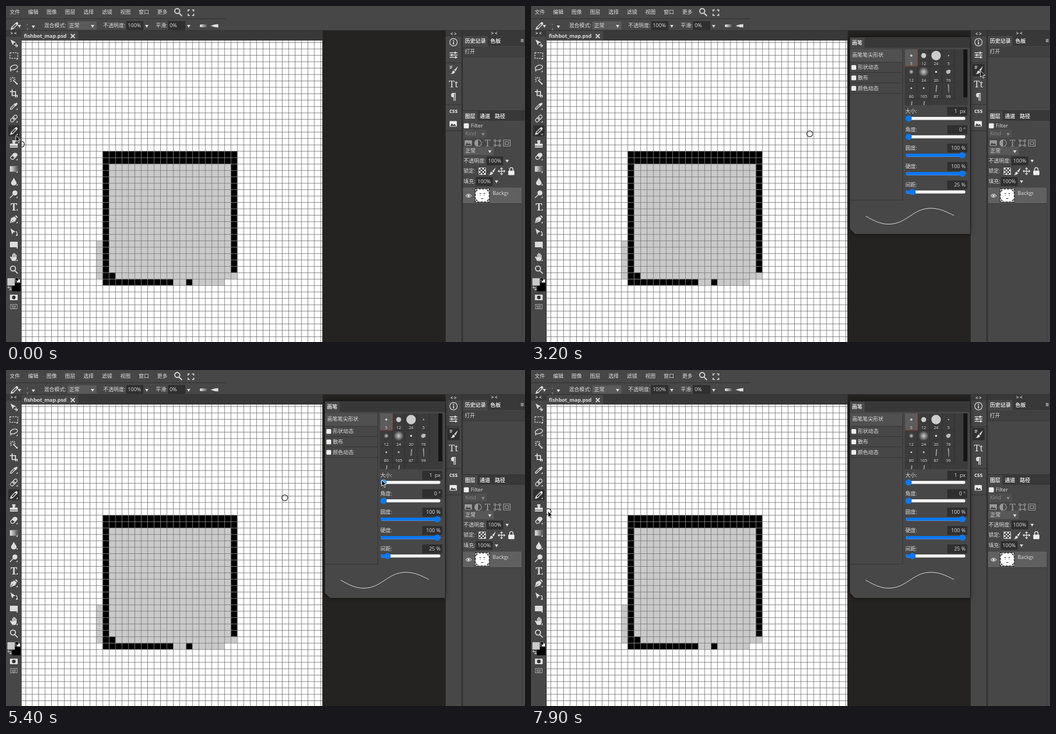
An HTML page for the animation above (8000 ms loop, 929 by 603 pixels).

```html
<!DOCTYPE html>
<html lang="zh">
<head>
<meta charset="utf-8">
<style>
html, body { margin: 0; width: 100%; height: 100%; overflow: hidden; background: #474747; }
svg { display: block; width: 929px; height: 603px; }
text { font-family: 'Open Sans', 'Noto Sans CJK SC', 'Noto Sans CJK', sans-serif; font-size: 9.32px; fill: #ddd; white-space: pre; }
.bold { font-weight: 700; }
.serif { font-family: 'Noto Serif', serif; }
.grid { mix-blend-mode: exclusion; }
</style>
</head>
<body>
<svg id="stage" viewBox="0 0 929 603">
  <defs>
    <linearGradient id="fade"><stop stop-color="#eee"/><stop offset="1" stop-color="#505050"/></linearGradient>
    <radialGradient id="soft"><stop stop-color="#ccc"/><stop offset="1" stop-color="#ccc" stop-opacity="0"/></radialGradient>
    <clipPath id="canvasArea"><rect x="28" y="62" width="538.2" height="541"/></clipPath>
    <clipPath id="layerName"><rect x="868" y="326" width="31" height="28"/></clipPath>
    <clipPath id="brushList"><rect x="669" y="78" width="113" height="100"/></clipPath>
    <filter id="shadow" x="-20%" y="-20%" width="140%" height="140%"><feDropShadow dx="0" dy="0" stdDeviation="5" flood-opacity=".55"/></filter>
  </defs>
</svg>
<script>
const PANEL = '#474747', DARK = '#2f2f2f', LIGHT = '#ddd', BLUE = '#0a78f5';
const rect = (x, y, w, h, fill, extra = '') =>
  `<rect x="${x}" y="${y}" width="${w}" height="${h}" fill="${fill}" ${extra}/>`;
// y is the vertical middle of the line
const text = (x, y, s, extra = '') => `<text x="${x}" y="${y + 3.4}" ${extra}>${s}</text>`;
const bold = (x, y, s, extra = '') => text(x, y, s, `class="bold" ${extra}`);
const circle = (x, y, r, fill, extra = '') => `<circle cx="${x}" cy="${y}" r="${r}" fill="${fill}" ${extra}/>`;
const solid = (x, y, d, fill = LIGHT) => `<path transform="translate(${x} ${y})" d="${d}" fill="${fill}"/>`;
const line = (x, y, d, width = 1.3, color = LIGHT, extra = '') =>
  `<path transform="translate(${x} ${y})" d="${d}" fill="none" stroke="${color}" stroke-width="${width}" ${extra}/>`;
const arrowDown = (x, y, fill = LIGHT) => solid(x, y, 'M-3-2H3L0 3Z', fill);
const field = (x, y, w, s) => rect(x, y - 8, w, 16, DARK, 'rx="1"') + text(x + 3, y, s);
const select = (x, y, w, s, bg, color = LIGHT) =>
  rect(x, y - 7.5, w, 15, bg, 'rx="1"') + text(x + 3, y, s, `style="fill:${color}"`) + arrowDown(x + w - 7, y + 1, color);

const PENCIL = 'M-7 7L-5.5 2L3-6.5Q4.5-8 6-6.5T6.5-3L-2 5.5ZM-4 2.5L-2.5 4L4-2.5L2.5-4Z';
const BRUSH = 'M7-7L3 2L0 0ZM-1 1L2 3Q1 7-6 7Q-3 5-3 3Q-3 1-1 1Z';
const MAGNIFIER = 'M2 2L7 7M3-2A4.5 4.5 0 1 1-6-2A4.5 4.5 0 1 1 3-2';
const MOVE = 'M-6 0H6M0-6V6M-4-2L-6 0L-4 2M4-2L6 0L4 2M-2-4L0-6L2-4M-2 4L0 6L2 4';
const picture = (x, y, color) => rect(x - 6, y - 5, 13, 10, color, 'rx="1"') + solid(x, y, 'M-5 4L-2-1L1 2L3 0L6 4Z', PANEL);

function drawing() {
  const pixel = .71725, cell = 16 * pixel, left = 241 * pixel, top = 363 * pixel;
  const fill = (col, row, cols, rows, color) =>
    rect(left + col * cell, top + row * cell, cols * cell, rows * cell, color);
  const gray = '#cacaca';
  let grid = '';
  for (let x = left - 12 * cell; x < 567; x += cell) grid += `M${x + pixel / 2} 62V603`;
  for (let y = top - 17 * cell; y < 603; y += cell) grid += `M28 ${y + pixel / 2}H567`;
  return `<g clip-path="url(#canvasArea)">` + rect(28, 62, 539, 541, '#fff') +
    fill(1, 2, 19, 18, gray) + fill(-1, 14, 1, 6, gray) + fill(20, 19, 1, 1, gray) + fill(11, 20, 8, 1, gray) +
    fill(0, 0, 21, 2, '#000') + fill(0, 2, 1, 19, '#000') + fill(20, 2, 1, 17, '#000') +
    fill(1, 19, 1, 1, '#000') + fill(1, 20, 10, 1, '#000') + fill(13, 20, 1, 1, '#000') +
    line(0, 0, grid, pixel, '#aaa', 'class="grid"') +
    circle(0, 0, 5.3, 'none', 'id="brush" stroke="#111" stroke-width="1.1"') + '</g>';
}

function topBars() {
  const menus = ['文件', '编辑', '图像', '图层', '选择', '滤镜', '视图', '窗口', '更多'];
  return rect(0, 0, 929, 44, PANEL) + rect(0, 22, 393, 1.5, '#383838') + rect(0, 43, 929, 1, '#383838') +
    menus.map((s, i) => text(6.5 + i * 33, 11, s)).join('') +
    line(308, 11, MAGNIFIER, 1.8) + line(331, 12, 'M-5-2V-5H-2M2-5H5V-2M5 2V5H2M-2 5H-5V2', 1.7) +
    solid(15, 36, PENCIL) + arrowDown(24, 36) + circle(38, 33, .7, LIGHT) +
    text(36.5, 41, '1', 'style="font-size:6px"') + arrowDown(49, 37) +
    text(68, 35, '混合模式:') + select(110, 35, 52, '正常', '#5a5a5a') +
    text(174, 35, '不透明度:') + field(215, 35, 31, '100%') + arrowDown(252, 36) +
    text(268, 35, '平滑:') + field(290, 35, 31, '0%') + arrowDown(327, 36) +
    rect(347, 33, 13, 5, 'url(#fade)', 'rx="2"') + solid(373, 35.5, 'M-7 0Q0-3 7-3V3Q0 3-7 0Z') +
    rect(28, 44, 539, 18, '#383838') + rect(28, 45, 101, 17, PANEL) +
    bold(32, 54, 'fishbot_map.psd') + line(119.5, 54, 'M-3.5-3.5L3.5 3.5M3.5-3.5L-3.5 3.5', 1.8);
}

function toolbar() {
  const tools = [
    solid(0, 0, 'M-6-6L4-1L0 0L-2 4Z') + line(4, 4, 'M-3.5 0H3.5M0-3.5V3.5'),
    line(0, 0, 'M-7-5H7V5H-7Z', 1.2, LIGHT, 'stroke-dasharray="3 1.6"'),
    line(0, 0, 'M-5 3C-10-2 0-7 5-5C10-2 3 4-4 3Q-7 3-5 6', 1.4),
    line(0, 0, 'M-1-1L6 6', 2) + line(-2, -2, 'M-5 0H-2M2 0H5M0-5V-2M-4-4L-2-2M4-4L2-2M-4 4L-2 2'),
    line(0, 0, 'M-3-7V4H7M-7-3H3V7', 1.8),
    line(0, 0, 'M1-4L4 0M2-1L6-5', 3.2) + line(0, 0, 'M0-2L-6 4V6H-4L2 0'),
    line(0, 0, 'M-6 2L2-6Q6-7 6-2L-2 6Q-6 7-6 2M-3-1L1 3M-1-3L3 1M-1-1L1 1', 1.3),
    solid(0, 0, PENCIL),
    solid(0, 0, 'M-3-6H3L2 0H7V4H-7V0H-2ZM-7 5H7V7H-7Z'),
    line(0, 0, 'M-6 2L0-5Q5-7 6-2L0 5Q-5 7-6 2', 1.4) + solid(0, 0, 'M-3-1L0-5Q5-7 6-2L2 3Z'),
    rect(-7, -5, 14, 10, 'url(#fade)', 'stroke="#888" stroke-width=".6"'),
    solid(0, 0, 'M0-7C2-2 5 0 5 3A5 4 0 0 1-5 3C-5 0-2-2 0-7'),
    circle(2, -2, 4.5, LIGHT) + line(0, 0, 'M-1 1L-7 7', 1.5),
    text(0, 3.2, 'T', 'class="serif" text-anchor="middle" style="font-size:18px;font-weight:600"'),
    solid(0, 0, 'M-7 7L-5-2L1-5L5-1L2 4ZM2-6L4-7L7-4L6-2Z') + line(0, 0, 'M-6 6L-1 1', 1, PANEL),
    solid(0, 0, 'M-6-6L3 0L-1 1L-3 5Z') + line(4, 3, 'M0-4Q4 0 0 4'),
    rect(-7, -5, 14, 10, LIGHT, 'rx="1"'),
    solid(0, 0, 'M-3 7L-7 0L-5-1L-3 1V-5H-1V-7H1V-6H3V-4H5V3L3 7Z') + line(0, 0, 'M-1-5V0M1-5V0M3-4V0', .6, PANEL),
    line(0, 0, MAGNIFIER, 1.8)
  ];
  return rect(0, 44, 28, 559, PANEL) + rect(0, 44, 28, 11, '#3a3a3a') + rect(27, 44, 1, 559, '#3c3c3c') +
    bold(13.5, 49, '&gt; &lt;', 'text-anchor="middle" style="font-size:8px"') +
    rect(4, 214, 20, 20, DARK, 'rx="2"') +
    tools.map((s, i) => `<g transform="translate(14 ${66.3 + i * 22.6})">${s}` +
      (i < 18 ? solid(7, 7, 'M0-3V0H-3Z') : '') + '</g>').join('') +
    rect(11, 497, 15, 15, '#000') + rect(2, 488, 14, 14, '#cacaca', 'stroke="#2a2a2a" stroke-width=".7"') +
    rect(20, 491, 5, 5, '#fff') + rect(17, 488, 5, 5, '#000', 'stroke="#bbb" stroke-width=".6"') +
    line(6, 507, 'M-1-4L-3-2L-1 0M-3-2H2V3M0 1L2 3L4 1', 1) +
    rect(7, 518, 14, 10, LIGHT, 'rx="1"') + circle(14, 523, 3.2, '#333') +
    line(14, 539.5, 'M-6-4H6V4H-6ZM-4-1.5H4M-4 .5H4M-3 2.5H3', 1, '#bbb', 'stroke-dasharray="2 .5"');
}

function iconColumn() {
  return rect(787, 44, 28, 559, PANEL) + rect(787, 44, 28, 11, '#3a3a3a') + rect(815, 44, 3, 559, '#333') +
    bold(801, 50, '&lt; &gt;', 'text-anchor="middle" style="font-size:8px"') +
    [101, 176, 223].map(y => rect(787, y, 28, 1.5, '#383838')).join('') +
    rect(790, 104, 22, 22, DARK, 'id="brushButton" rx="2"') +
    circle(801, 65, 6.7, 'none', `stroke="${LIGHT}" stroke-width="1.2"`) + line(801, 65, 'M0-4V-2M0-1V4', 1.7) +
    line(801, 88, 'M-7-4H7M-7 0H7M-7 4H7', 1.3) + line(801, 88, 'M3-6V-2M-3-2V2M4 2V6', 2) +
    solid(802, 115, BRUSH) + line(797, 110, 'M-3-2H2M-3 0H2M-3 2H1', 1) +
    text(801, 143, 'Tt', 'class="serif" text-anchor="middle" style="font-size:17px"') +
    bold(801, 165, '¶', 'text-anchor="middle" style="font-size:16px"') +
    bold(801, 189, 'css', 'text-anchor="middle" style="font-size:10px"') +
    picture(800, 211.5, '#eee');
}

function sidePanels() {
  const dim = '#8c8c8c';
  let checker = '';
  for (let i = 0; i < 16; i++) if ((i + (i >> 2)) % 2 === 0)
    checker += rect(846.5 + i % 4 * 3, 290.5 + (i >> 2) * 3, 3, 3, '#eee');
  return rect(818, 44, 111, 559, PANEL) + rect(818, 44, 111, 28, '#383838') +
    bold(874, 49, '&gt; &lt;', 'text-anchor="middle" style="font-size:8px"') +
    rect(818, 54, 44, 19, PANEL) + bold(821.5, 63, '历史记录') + bold(867, 63, '色板') +
    line(924, 62, 'M-2.5-2H2.5M-2.5 0H2.5M-2.5 2H2.5', 1) +
    rect(818, 73, 111, 18, '#404040') + rect(818, 91, 111, 1, '#383838') + text(821, 82, '打开') +
    rect(818, 187, 111, 19, '#383838') + rect(818, 189, 26, 17, PANEL) +
    bold(821.5, 198, '图层') + bold(848, 198, '通道') + bold(875, 198, '路径') +
    rect(819.5, 210.5, 9, 9, '#eee', 'rx="1.5"') + text(832, 214.5, 'Filter') +
    select(819, 229, 42, 'Kind', '#4f4f4f', dim) +
    picture(827, 246, '#999') + circle(845, 246, 6, 'none', 'stroke="#999" stroke-width="1.2"') +
    solid(845, 246, 'M0-6A6 6 0 0 0 0 6Z', '#999') +
    text(862, 248.5, 'T', 'class="serif" text-anchor="middle" style="font-size:17px;fill:#999"') +
    line(879.5, 246, 'M-4-4H4V4H-4ZM-6-6H-3V-3H-6ZM3-6H6V-3H3ZM-6 3H-3V6H-6ZM3 3H6V6H3Z', 1, '#999') +
    line(896.5, 246, 'M-6-5.5H6V5.5H-6ZM-3-2.5H3V2.5H-3Z', 1.2, '#999') +
    select(819, 260, 54, '正常', '#585858') +
    text(819, 278, '不透明度:') + field(860, 278, 30, '100%') + arrowDown(897, 278) +
    text(819, 296, '锁定:') + rect(846.5, 290.5, 12, 12, '#222') + checker +
    line(852.5, 296.5, 'M-6-6H6V6H-6Z', 1) + solid(870, 296.5, BRUSH) + line(887, 296.5, MOVE) +
    rect(899, 295.5, 11, 8, '#eee', 'rx="1"') + line(904.5, 295, 'M-3 1V-2A3 3 0 0 1 3-2V1', 1.6) +
    text(819, 315, '填充:') + field(841, 315, 30, '100%') + arrowDown(878, 315) +
    rect(818, 326, 105, 28, '#606060') + rect(923, 326, 1, 277, '#3e3e3e') + rect(818, 354, 105, 1, '#3c3c3c') +
    line(828, 340.5, 'M-5 0Q0-6 5 0Q0 6-5 0', 1.1) + circle(828, 340.5, 2, LIGHT) +
    rect(840, 328, 25, 23.5, '#fff') +
    line(852.5, 340, 'M-12.5-11.7H12.5V11.7H-12.5Z', 1.3, '#111', 'stroke-dasharray="4 2"') +
    solid(852.5, 340, 'M-11-10H-8L-11-6ZM11-10H8L11-6ZM-11 10H-8L-11 6ZM11 10H8L11 6ZM-5-4H-2V-3H-5ZM2-4H5V-3H2ZM-4-1H-3V0H-4ZM3-1H4V0H3ZM-2 5H2V6H-2Z', '#222') +
    text(871, 336, 'Background', 'clip-path="url(#layerName)"');
}

function brushPanel() {
  const sizes = [5, 12, 24, 5, 12, 24, 20, 76, 80, 105, 87, 99];
  const tips = [
    solid(0, 0, 'M0-2.5L2.5 0L0 2.5L-2.5 0Z', '#ccc'), circle(0, 0, 4.5, '#ccc'), circle(0, 0, 8.5, '#ccc'),
    circle(0, 0, 2, 'url(#soft)'), circle(0, 0, 4.5, 'url(#soft)'), circle(0, 0, 9, 'url(#soft)'),
    rect(-1.5, -1.5, 3, 3, '#eee'), solid(0, 0, 'M-4-2L0-4L4-3L3 2L-1 4L-4 2Z', '#bbb'),
    circle(0, 0, 1.5, '#ccc'), circle(0, 0, 1.7, '#bbb'),
    solid(0, 0, 'M0-5L2-6L1 6L-1 7Z', '#999'), solid(0, 0, 'M-1-8L1-6L1 8L0 8Z', '#aaa')
  ];
  let list = rect(669.5, 78, 22, 30, '#5c5c5c');
  tips.concat(tips[10], tips[10]).forEach((tip, i) => {
    const x = 680.7 + i % 4 * 22.2, y = 89 + (i >> 2) * 29.2;
    list += `<g transform="translate(${x} ${y})">${tip}</g>` +
      (sizes[i] ? text(x, y + 14, sizes[i], 'text-anchor="middle" style="font-size:7.3px"') : '');
  });
  const cells = 'M691.5 78V178M713.8 78V178M736 78V166M758 78V166M669 108H758M669 137H758M669 166H758';
  const sliders = [
    ['大小', '1  px', 676], ['角度', '0 °', 676], ['圆度', '100 %', 772], ['硬度', '100 %', 772], ['间距', '25 %', 683]
  ].map(([label, value, x], i) => {
    const y = 189 + i * 33;
    return text(670, y, label + ':') + rect(745, y - 8, 36, 16, DARK, 'rx="1"') +
      text(778, y, value, 'text-anchor="end"') +
      rect(671, y + 10, 106.5, 5.4, '#f2f2f2', 'rx="2.7"') + rect(671, y + 10, x - 671, 5.4, BLUE, 'rx="2.7"') +
      circle(x, y + 12.8, 5.6, BLUE, i ? '' : 'id="sizeThumb"');
  }).join('');
  return `<g id="brushPanel"><path d="M571 56H786V409H580L571 400Z" fill="${PANEL}" filter="url(#shadow)"/>` +
    rect(571, 56, 215, 19, '#383838') + rect(571, 57, 26, 18, PANEL) + bold(574.5, 66, '画笔') +
    rect(571, 78, 94, 23, '#505050') + text(575, 87.5, '画笔笔尖形状') +
    ['形状动态', '散布', '颜色动态'].map((s, i) => {
      const y = 110 + i * 18.7;
      return rect(573.5, y - 4, 8.5, 8.5, '#eee', 'rx="1.5"') + text(585, y, s);
    }).join('') +
    line(0, 0, 'M571 101H665M571 119.5H665M571 138H665M571 157H665M571 348.5H665M665.5 75V349', 1, '#353535') +
    `<g clip-path="url(#brushList)">` + rect(669, 78, 113, 100, '#3b3b3b') +
    list + line(0, 0, cells, 1, '#303030') + line(0, 0, 'M691.5 78V108H669', 1, '#a5463c') +
    rect(774, 78, 7, 86, '#141414') + '</g>' + sliders +
    line(599, 377, 'M0 0C14 8 26 14.5 41 14.5C74 14.5 84-14 117-14C133-14 146-7 158-1', 1, '#e0e0e0') + '</g>';
}

const stage = document.getElementById('stage');
const caretShape = 'M-3-6Q0-6 0-4Q0-6 3-6M0-5V5M-3 6Q0 6 0 4Q0 6 3 6';
stage.innerHTML += rect(0, 0, 929, 603, '#242322') + drawing() + topBars() + toolbar() +
  iconColumn() + sidePanels() + brushPanel() +
  `<path id="pointer" d="M.5 .5V11.5L3 9.2L5.2 13.8L7 13L5 8.5H9Z" fill="#1c1c1c" stroke="#eee" stroke-width=".9"/>` +
  `<g id="caret">${line(0, 0, caretShape, 2, '#222')}${line(0, 0, caretShape, 1)}</g>`;

// [time, x, y]
const pointerPath = [
  [0, 17, 232], [1000, 17, 232], [1400, 17, 224], [1800, 17, 224], [2000, 860, 223], [2100, 860, 223],
  [2200, 881, 153], [2500, 826, 105], [2800, 826, 105], [2900, 806, 114], [3100, 806, 114], [3200, 804, 116],
  [3500, 915, 125], [4000, 674, 94], [4300, 746, 190], [4700, 746, 190], [4800, 747, 194], [5400, 672, 197],
  [5600, 672, 197], [6000, 669, 197], [6500, 674, 196], [7000, 696, 242], [7400, 647, 203], [7900, 30, 253]
];
const brushPath = [
  [0, 27.7, 248], [1800, 27.7, 248], [1900, 250, 257], [2000, 437, 230], [2100, 437, 230],
  [2200, 499, 229.3], [7400, 499, 229.3], [7900, 30.7, 254]
];

function position(path, t) {
  const next = path.findIndex(key => key[0] > t);
  if (next < 0) return path[path.length - 1].slice(1);
  const [t0, x0, y0] = path[next - 1], [t1, x1, y1] = path[next];
  const k = (t - t0) / (t1 - t0);
  return [x0 + (x1 - x0) * k, y0 + (y1 - y0) * k];
}

const part = id => document.getElementById(id);
const place = (id, [x, y]) => part(id).setAttribute('transform', `translate(${x} ${y})`);
const show = (id, visible) => part(id).setAttribute('visibility', visible ? 'visible' : 'hidden');
const within = (t, from, to) => t >= from && t < to;

function render(now) {
  const t = Math.floor(now % 8000 / 100) * 100;
  const spot = position(pointerPath, t);
  const caret = within(t, 4300, 5000);
  const hidden = t === 1900 || within(t, 2300, 2500) || within(t, 7500, 7900);
  place('pointer', spot);
  place('caret', spot);
  place('brush', position(brushPath, t));
  show('pointer', !caret && !hidden);
  show('caret', caret);
  show('brushButton', t >= 2900);
  show('brushPanel', t >= 3200);
  part('sizeThumb').setAttribute('fill', within(t, 5300, 6600) ? '#4a9ff0' : BLUE);
}

const start = performance.now();
function tick() {
  render(performance.now() - start);
  requestAnimationFrame(tick);
}
tick();
</script>
</body>
</html>
```
